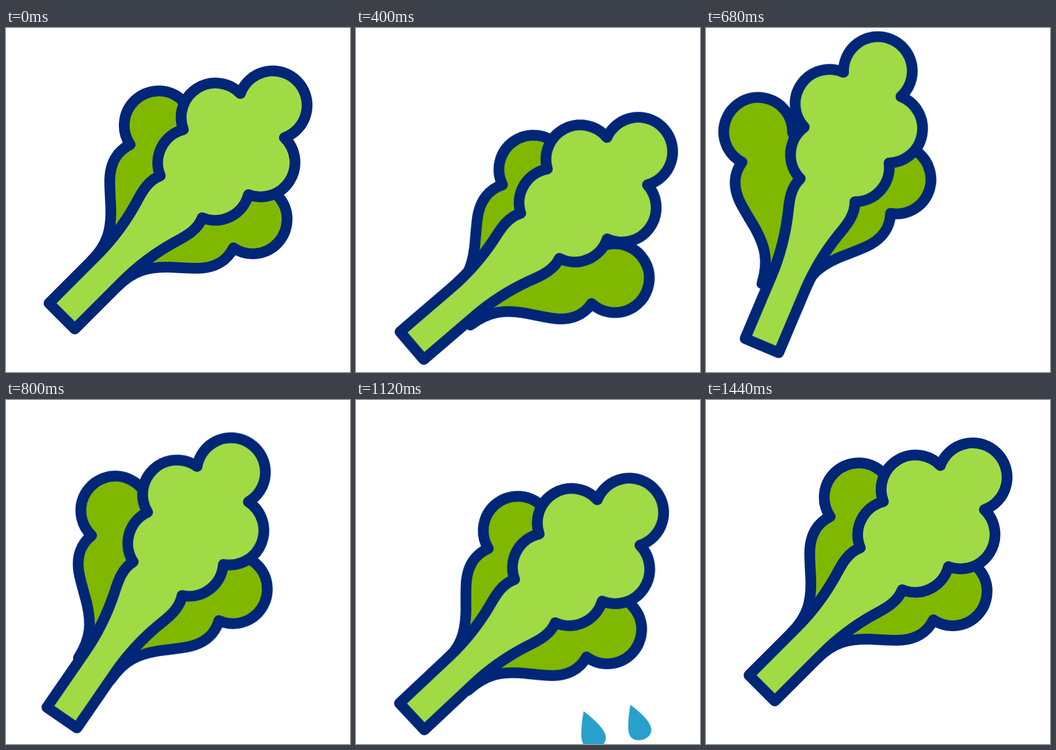
These frames come from a looping animation (640 by 640 pixels, 1.48 s). An HTML page:

```html
<!DOCTYPE html>
<html lang="en">
<head>
<meta charset="utf-8">
<title>Lettuce shake</title>
<style>
  html, body { margin: 0; width: 100%; height: 100%; overflow: hidden; background: #fff; }
  svg { display: block; width: 100%; height: 100%; }
  .ink { stroke: #002677; stroke-width: 20; stroke-linejoin: round; stroke-linecap: round; }
  .dark { fill: #80b800; }
  .light { fill: #a0db45; }
  .drop { fill: #28a0cc; }
  .swing { transform-origin: 104px 536px; }
</style>
</head>
<body>
<svg viewBox="0 0 640 640">
  <defs>
    <path id="leaf" d="M158 434 C190 402 196 374 195 335 C194 315 193 300 193 285
      C193 250 208 228 231 217 A64 64 0 1 1 340 212 L330 330 L200 440 Z"/>
    <path id="bead" d="M0 0 C16 12 38 31 39 45 C40 57 29 66 15 66 C1 66 -4 55 -4 42 C-4 25 -2 12 0 0 Z"/>
  </defs>
  <g id="drops" class="drop">
    <use href="#bead" transform="translate(423 578) scale(1.06)"/>
    <use href="#bead" transform="translate(510 566)"/>
  </g>
  <g id="lift" class="ink">
    <g id="left" class="swing dark"><use href="#leaf"/></g>
    <g id="right" class="swing dark"><use href="#leaf" transform="matrix(0 -1 -1 0 640 640)"/></g>
    <g id="head" class="swing light">
      <path d="M80 512 L168 424 C200 392 222 361 240 329 C250 311 262 284 287 275
        A64 64 0 0 1 330 189 A64 64 0 0 1 436 122 A64 64 0 1 1 518 204
        A64 64 0 0 1 451 310 A64 64 0 0 1 365 353
        C356 378 329 390 311 400 C279 418 248 440 216 472 L128 560 Z"/>
    </g>
  </g>
</svg>
<script>
  const LOOP = 1480;
  const WINDUP = 'cubic-bezier(.52,0,.72,1)';
  const SMOOTH = 'cubic-bezier(.33,0,.67,1)';

  // steps: [time in ms, value, easing towards the next step]
  function play(id, steps, style) {
    const frames = steps.map(([time, value, easing = SMOOTH]) =>
      ({ offset: time / LOOP, easing, ...style(value) }));
    document.getElementById(id).animate(frames, { duration: LOOP, iterations: Infinity });
  }

  const rotate = deg => ({ transform: `rotate(${deg}deg)` });
  const sink = y => ({ transform: `translateY(${y}px)` });
  const fall = d => ({ transform: `translate(${d * 0.37}px, ${d * 0.93}px)` });

  function swing(id, windup, back, hit) {
    play(id, [[0, 0, WINDUP], [400, windup], [680, back], [960, hit], [1200, 0], [LOOP, 0]], rotate);
  }

  swing('head', 4.4, -22.1, 7.1);
  swing('left', 7.7, -27.9, 10.8);
  swing('right', 8.5, -24.1, 11.15);
  play('lift', [[0, 0, WINDUP], [400, 55], [1080, 55], [1440, 0], [LOOP, 0]], sink);

  // drops wait off stage, then fly out from behind the leaves
  play('drops', [[0, 400, 'step-end'], [960, -130, 'linear'], [1120, 0, 'linear'],
    [1280, 165], [1300, 400], [LOOP, 400]], fall);
</script>
</body>
</html>
```
